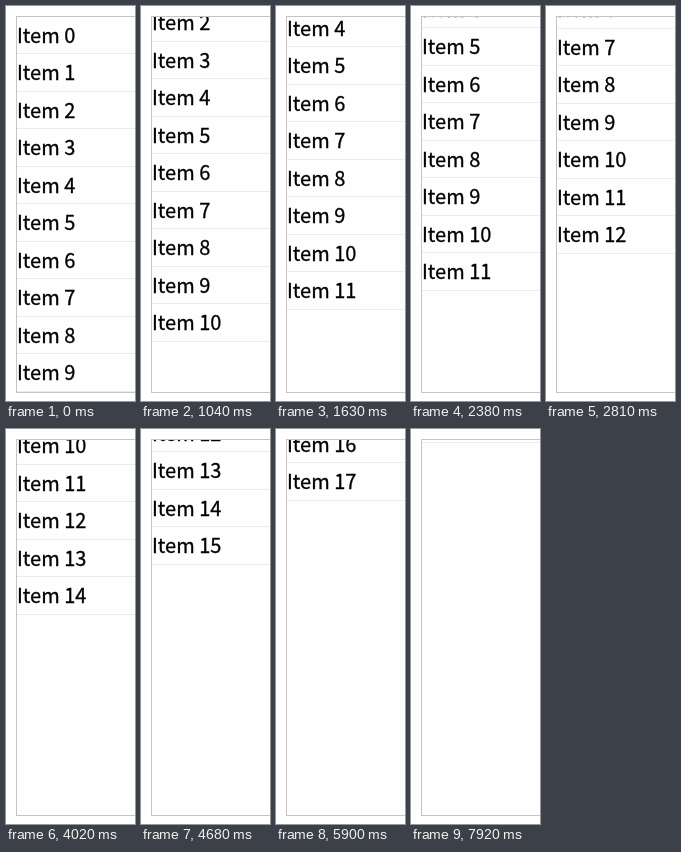
These frames come from a looping animation (129x395 px, 8000 ms). An HTML page:

```html
<!DOCTYPE html>
<html lang="en">
<head>
<meta charset="utf-8">
<title>Scrolling list</title>
<style>
  html, body { margin: 0; width: 100%; height: 100%; overflow: hidden; background: #fff; }
  #view {
    position: absolute; left: 10px; right: 0; top: 10px; height: 375px;
    border: 1px solid #c4c4c4; border-right: 0; background: #fefefe; overflow: hidden;
  }
  #list { position: absolute; left: 0; right: 0; top: 0; }
  .row {
    box-sizing: border-box; height: 37.5px; border-bottom: 1px solid #ebebeb;
    font: 20px/36.5px "Noto Sans CJK SC", "Noto Sans CJK JP", "Noto Sans CJK", sans-serif;
    color: #000; -webkit-text-stroke: 0.3px #000; white-space: nowrap; overflow: hidden;
  }
</style>
</head>
<body>
<div id="view"><div id="list"></div></div>
<script>
  const LOOP = 8000, ROW = 37.5, COUNT = 10;
  const STEP = 50, MAX_OFFSET = 372;

  // Start and end time of each scroll by one step.
  const scrolls = [
    [750, 1040], [1370, 1930], [2380, 3110], [3470, 4020],
    [4320, 4680], [5030, 5490], [5770, 6500], [6830, 7000]
  ];

  const list = document.getElementById('list');
  const rows = Array.from({ length: COUNT }, () => {
    const row = document.createElement('div');
    row.className = 'row';
    return list.appendChild(row);
  });

  const easeOut = u => 1 - Math.pow(1 - u, 1.6);

  function scrolled(time, [start, end]) {
    if (time < start) return 0;
    const progress = Math.min(1, (time - start) / (end - start));
    return Math.round(1 + (STEP - 1) * easeOut(progress));
  }

  function offsetAt(time) {
    const total = scrolls.reduce((sum, scroll) => sum + scrolled(time, scroll), 0);
    return Math.min(total, MAX_OFFSET);
  }

  function render(time) {
    const offset = offsetAt(time);
    // Rows are recycled as the offset passes them, without a spacer above.
    const first = Math.floor(offset / ROW);
    // The small shift makes half-pixel row edges round up the page.
    list.style.top = -offset - 0.1 + 'px';
    rows.forEach((row, i) => { row.textContent = 'Item ' + (first + i); });
  }

  const origin = performance.now();
  function tick() {
    render((performance.now() - origin) % LOOP);
    requestAnimationFrame(tick);
  }
  tick();
</script>
</body>
</html>
```
